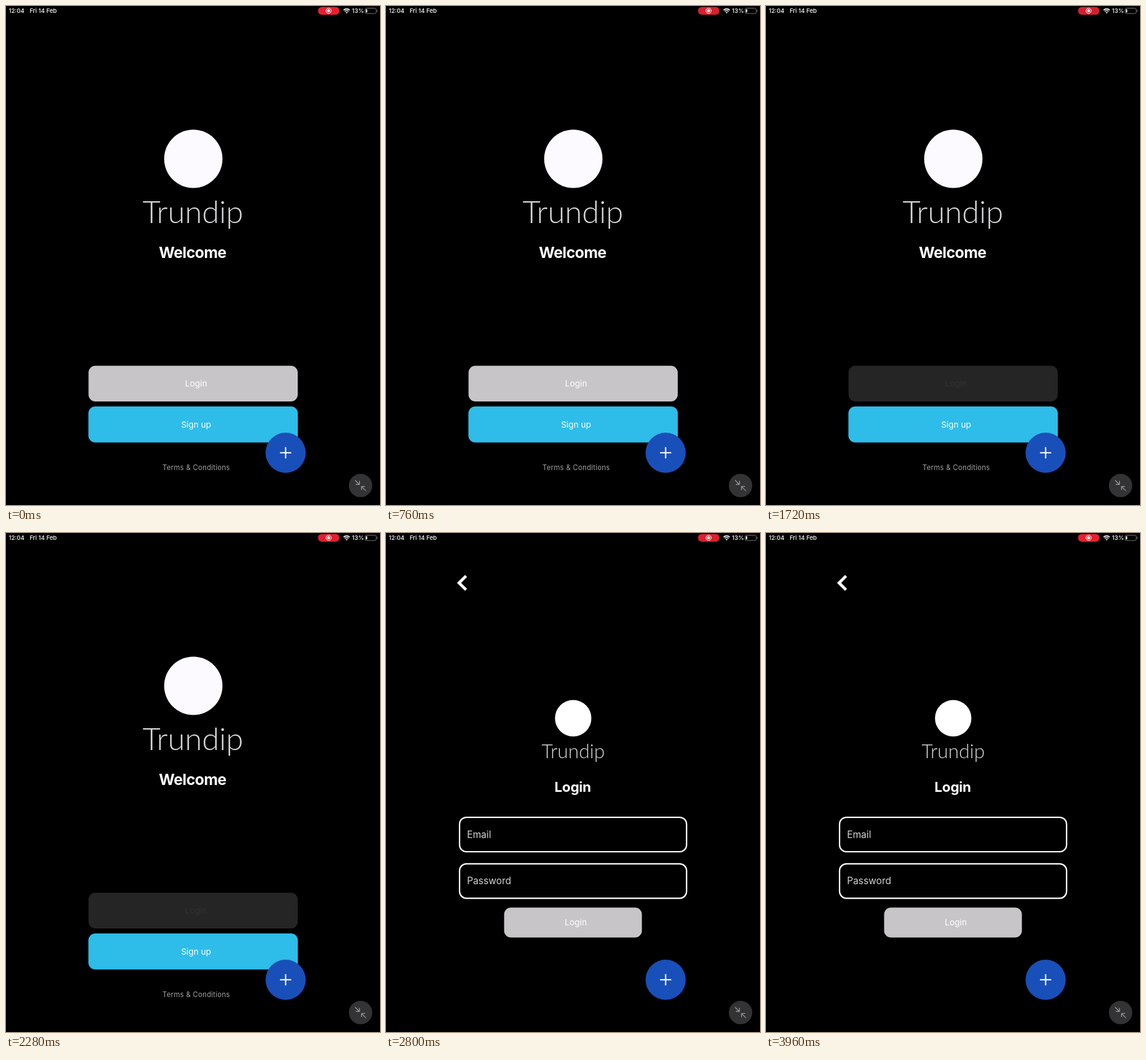
Recreate the animation shown at these times as an HTML page. Size 600 by 800 pixels, loop 4 s.

```html
<!DOCTYPE html>
<html lang="en">
<head>
<meta charset="utf-8">
<title>Welcome and login</title>
<style>
html, body { margin: 0; width: 100%; height: 100%; overflow: hidden; background: #000; }
svg { display: block; width: 600px; height: 800px; }
text { font-family: Inter, "Open Sans", sans-serif; fill: #fff; }
.mid { text-anchor: middle; }
.brand { font-family: Lato, "Open Sans", sans-serif; font-weight: 300; fill: #dcdadd; }
.title { font-weight: 700; }
.status { font-size: 9.5px; font-weight: 500; }
.label { font-size: 13.5px; }
.hint { font-size: 15.3px; fill: #d2d2d2; }
.terms { font-size: 11.2px; letter-spacing: .28px; fill: #a0a0a0; }
.grey { fill: #c8c5c9; }
.line { fill: none; stroke: #fff; }

/* the two screens swap with a hard cut */
.welcome { animation: leave 4s step-end infinite; }
.login { animation: enter 4s step-end infinite; }
.press { animation: press 4s linear infinite; }
.pulse { animation: pulse 1s -.94s ease-in-out infinite; }
@keyframes leave { 0% { visibility: visible; } 57.5%, 100% { visibility: hidden; } }
@keyframes enter { 0% { visibility: hidden; } 57.5%, 100% { visibility: visible; } }
@keyframes press {
  0% { opacity: 1; }
  24% { opacity: 1; animation-timing-function: ease-in-out; }
  27.75%, 100% { opacity: .19; }
}
@keyframes pulse { 0%, 100% { fill: #e8202f; } 50% { fill: #cf202e; } }
</style>
</head>
<body>
<svg viewBox="0 0 600 800">
  <rect width="600" height="800"/>

  <g class="status-bar">
    <text class="status" x="4.5" y="11">12:04</text>
    <text class="status" x="38" y="11">Fri 14 Feb</text>
    <rect class="pulse" x="500.5" y="1.5" width="34.5" height="12.5" rx="6.2"/>
    <circle class="line" cx="517.6" cy="7.7" r="4.2"/>
    <circle cx="517.6" cy="7.7" r="2.4" fill="#fff"/>
    <g class="line" stroke-width="1.6">
      <path d="M541.6 6.6a7 7 0 0 1 9.8 0"/>
      <path d="M543.5 8.7a4.3 4.3 0 0 1 6 0"/>
    </g>
    <path d="M544.8 10.3a2.4 2.4 0 0 1 3.4 0L546.5 12z" fill="#fff"/>
    <text class="status" x="555" y="11">13%</text>
    <rect x="576" y="3.5" width="18" height="8.6" rx="2.4" fill="none" stroke="#747474"/>
    <rect x="577.4" y="5" width="2" height="5.6" rx=".8" fill="#fff"/>
    <path d="M595.4 6.3v3" stroke="#747474"/>
  </g>

  <g class="welcome">
    <circle cx="300.5" cy="245" r="46.8" fill="#fdfaff"/>
    <text class="brand mid" x="299.8" y="348" font-size="50">Trundip</text>
    <text class="title mid" x="299.4" y="403.5" font-size="24.6" letter-spacing="-.6">Welcome</text>
    <g class="press">
      <rect class="grey" x="132.4" y="576.8" width="335.6" height="57.2" rx="11"/>
      <text class="label mid" x="305" y="610.3">Login</text>
    </g>
    <rect x="132.2" y="642.1" width="336" height="57.6" rx="11" fill="#2ebce9"/>
    <text class="label mid" x="305" y="675.8">Sign up</text>
    <text class="terms mid" x="305.2" y="744">Terms &amp; Conditions</text>
  </g>

  <g class="login">
    <path class="line" d="M128.4 68.8 117.2 80l11.2 11.2" stroke-width="4.6"/>
    <circle cx="300.3" cy="297" r="29.2" fill="#fff"/>
    <text class="brand mid" x="300.3" y="361" font-size="31.4">Trundip</text>
    <text class="title mid" x="299.6" y="415" font-size="22.2" letter-spacing="-.3">Login</text>
    <g class="line" stroke-width="2.2">
      <rect x="118" y="455.8" width="364.2" height="55.2" rx="11"/>
      <rect x="118" y="530.4" width="364.2" height="55.2" rx="11"/>
    </g>
    <text class="hint" x="130" y="488.5">Email</text>
    <text class="hint" x="130" y="563.3">Password</text>
    <rect class="grey" x="189.5" y="600.5" width="221" height="48" rx="11"/>
    <text class="label mid" x="304.5" y="629.2">Login</text>
  </g>

  <circle cx="448.6" cy="716.2" r="32.2" fill="#194fb9"/>
  <path class="line" d="M439.6 716.2h18M448.6 707.2v18" stroke-width="2"/>

  <circle cx="568.8" cy="768.8" r="18.8" fill="#333335"/>
  <path d="M560 760.2l7 7M567 761.3v5.7h-5.7M577.4 777.4l-7-7M570.4 776.1v-5.7h5.7"
        fill="none" stroke="#98989a" stroke-width="1.3"/>
</svg>
</body>
</html>
```
